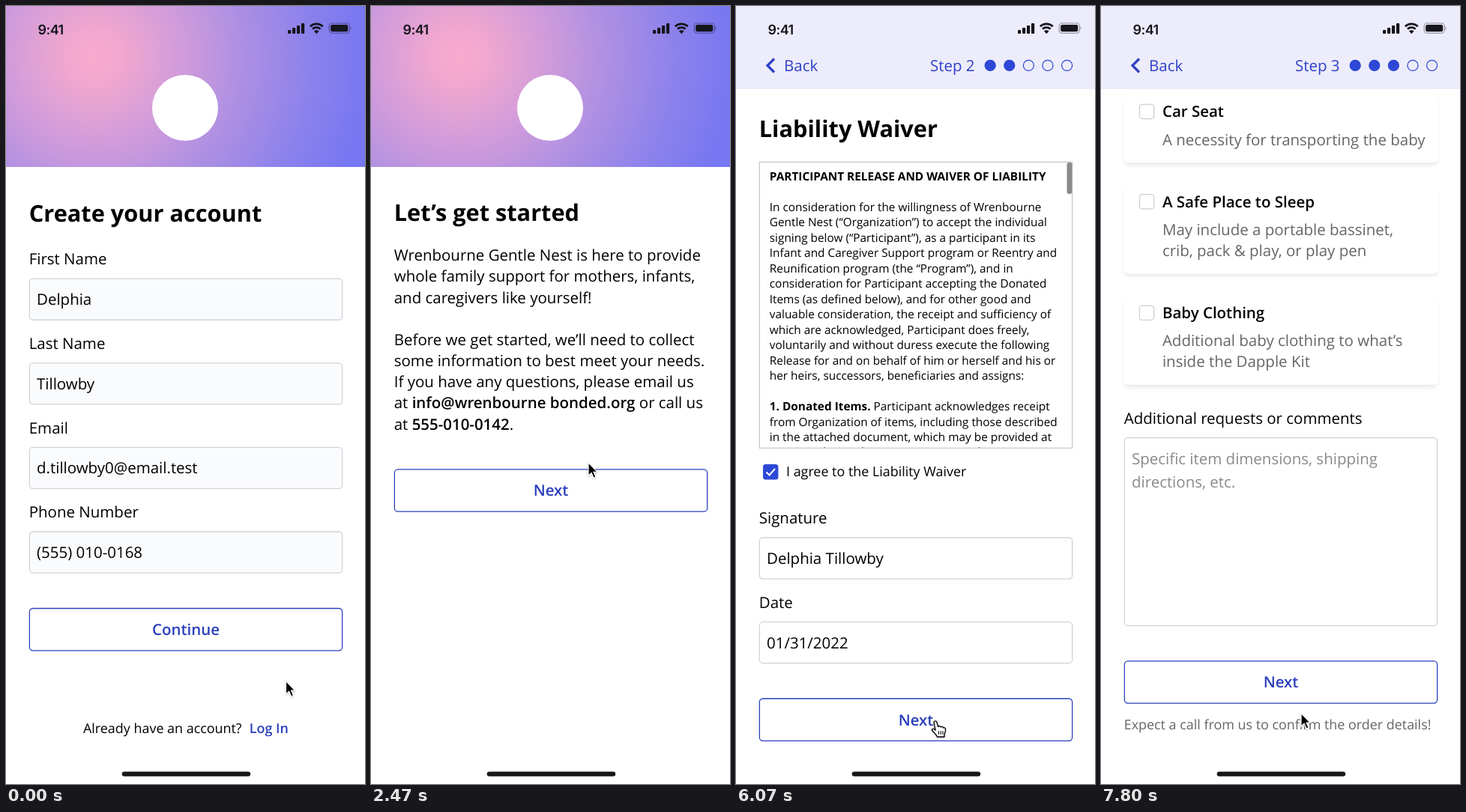
Recreate the animation shown at these times as an HTML page. Size 479x1039 px, loop 8000 ms.

```html
<!DOCTYPE html>
<html lang="en">
<head>
<meta charset="utf-8">
<title>Sign-up flow</title>
<style>
html, body { margin: 0; width: 100%; height: 100%; overflow: hidden; background: #fff; }
svg { display: block; width: 479px; height: 1039px; }
text { font-family: "Open Sans", "Noto Sans", sans-serif; white-space: pre; text-rendering: geometricPrecision; }
.b { font-weight: 600; }
.bb { font-weight: 700; }
.clock { font-family: Inter, sans-serif; letter-spacing: -.6px; }
</style>
</head>
<body>
<svg id="stage" viewBox="0 0 479 1039" xmlns="http://www.w3.org/2000/svg"></svg>
<script>
const LOOP = 8000, FPS = 15;
// the layout is 375 units wide, shown at this scale
const U = 1.28;
const TITLE = 24 * U, BODY = 16 * U, SMALL = 14 * U, FINE = 12 * U;
const BLUE = '#2b3fbc', BRIGHT = '#2d48d6', GREY = '#666';
const LEFT = 24 * U, WIDE = 327 * U, EDGE = U / 2;

// y is the middle of the capitals
const text = (x, y, str, size = BODY, weight = 400, fill = '#000', extra = '') =>
  `<text x="${x}" y="${(y + size * 0.357).toFixed(2)}" font-size="${size.toFixed(2)}" font-weight="${weight}" fill="${fill}" ${extra}>${str}</text>`;
const lines = (x, y, pitch, rows, size, fill) =>
  rows.map((row, i) => text(x, y + i * pitch, row, size, 400, fill)).join('');
const rect = (x, y, w, h, r, fill, extra = '') =>
  `<rect x="${x}" y="${y}" width="${w}" height="${h}" rx="${r}" fill="${fill}" ${extra}/>`;
const line = (d, color, width, extra = '') =>
  `<path d="${d}" fill="none" stroke="${color}" stroke-width="${width}" ${extra}/>`;

const title = (y, str) => text(LEFT, y, str, TITLE, 700);
const frame = (y, h, r, fill, color) =>
  rect(LEFT + EDGE, y, WIDE - U, h, r, fill, `stroke="${color}" stroke-width="${U}"`);
const box = (y, h, fill) => frame(y, h, 4.5, fill, '#d3d3d8');
const field = (y, label, value, fill = '#fff') =>
  text(LEFT, y, label) + box(y + 26.2, 43 * U, fill) + text(41, y + 53.8, value);
const tinted = (y, label, value) => field(y, label, value, '#fafbfd');
const button = (y, label) => frame(y, 44 * U, 4.5, '#fff', BLUE) +
  text(240, y + 28.2, label, BODY, 600, BLUE, 'text-anchor="middle"');
const back = (color, weight) =>
  line('M51 70.5L42 79.5L51 88.5', color, 3.3) + text(64, 79.5, 'Back', BODY, weight, color);
const logIn = text(103, 965, 'Already have an account?', SMALL) + text(324.8, 965, 'Log In', SMALL, 600, BLUE);
const tick = (x, y, color) => line(`M${x + 4.5} ${y + 10.5}l4 4l7.5 -8.5`, color, 2);

const brandHead = rect(0, 0, 479, 215, 0, 'url(#glow)') + '<circle cx="239" cy="136" r="44" fill="#fff"/>';
const stepHead = n => {
  let dots = '';
  for (let i = 0; i < 5; i++)
    dots += `<circle cx="${339.2 + i * 20 * U}" cy="79.4" r="7.04" fill="${i < n ? BRIGHT : 'none'}" stroke="${BRIGHT}" stroke-width="${U}"/>`;
  return rect(0, 0, 479, 111, 0, '#edecfa') + back('#3040c8', 400) +
    text(259, 79.5, 'Step ' + n, BODY, 400, '#3040c8') + dots;
};

const account = brandHead + title(277, 'Create your account') +
  tinted(338, 'First Name', 'Delphia') +
  tinted(450.6, 'Last Name', 'Tillowby') +
  tinted(563.2, 'Email', 'd.tillowby0@email.test') +
  tinted(675.8, 'Phone Number', '(555) 010-0168') +
  button(804.5, 'Continue') + logIn;

const dots = '•'.repeat(10);
const password = brandHead + back('#0a0a14', 600) + title(277, 'Create a password') +
  tinted(338, 'New Password', dots) +
  tinted(450.6, 'Confirm Password', dots) +
  button(579.3, 'Get started') + logIn;

const welcome = brandHead + title(275.7, 'Let’s get started') +
  lines(LEFT, 333, 22 * U, [
    'Wrenbourne Gentle Nest is here to provide',
    'whole family support for mothers, infants,',
    'and caregivers like yourself!',
    '',
    'Before we get started, we’ll need to collect',
    'some information to best meet your needs.',
    'If you have any questions, please email us',
    'at <tspan class="b">info@wrenbourne bonded.org</tspan> or call us',
    'at <tspan class="b">555-010-0142</tspan>.'
  ]) + button(618.9, 'Next');

const household = stepHead(1) + title(164, 'Household Information') +
  field(223, 'Number of Adults', '1') +
  field(335.6, 'Number of Children (current)', '3') +
  field(448.2, 'Ages of Children', '3, 8, 11') +
  button(576.7, 'Next');

const waiver = stepHead(2) + title(164, 'Liability Waiver') +
  frame(208.4, 382, 0, '#fff', '#c8c8cc') +
  '<g clip-path="url(#paper)">' +
  text(35 * U, 227.5, 'PARTICIPANT RELEASE AND WAIVER OF LIABILITY', FINE, 700) +
  lines(35 * U, 268.3, 16 * U, [
    'In consideration for the willingness of Wrenbourne',
    'Gentle Nest (“Organization”) to accept the individual',
    'signing below (“Participant”), as a participant in its',
    'Infant and Caregiver Support program or Reentry and',
    'Reunification program (the “Program”), and in',
    'consideration for Participant accepting the Donated',
    'Items (as defined below), and for other good and',
    'valuable consideration, the receipt and sufficiency of',
    'which are acknowledged, Participant does freely,',
    'voluntarily and without duress execute the following',
    'Release for and on behalf of him or herself and his or',
    'her heirs, successors, beneficiaries and assigns:',
    '',
    '<tspan class="bb">1. Donated Items.</tspan> Participant acknowledges receipt',
    'from Organization of items, including those described',
    'in the attached document, which may be provided at',
    'any time during the Program (“Donated Items”)'
  ], FINE) + '</g>' +
  rect(441.5, 209, 6.8, 42, 3, '#8b8b8e') +
  rect(36, 612, 20.4, 20.4, 3.5, BRIGHT) + tick(36, 612, '#fff') +
  text(67, 622, 'I agree to the Liability Waiver', SMALL) +
  field(683.8, 'Signature', 'Delphia Tillowby') +
  field(796.4, 'Date', '01/31/2022') +
  button(925, 'Next');

const card = (y, h, name, rows, done) =>
  rect(LEFT, y - 21, WIDE, h, 6, '#fff', 'filter="url(#lift)"') +
  rect(51.5, y - 9.6, 19.2, 19.2, 3.5, '#fff', `stroke="#cfcfd4" stroke-width="${U}"`) +
  (done ? tick(51, y - 10, '#777') : '') +
  text(64 * U, y, name, BODY, 600, done ? GREY : '#000') +
  lines(64 * U, y + 37.3, 22 * U, rows, BODY, GREY);

const request = '<g id="scroll">' + title(153, 'Request Items') +
  lines(LEFT, 203, 22 * U, ['Wrenbourne Gentle Nest will deliver you', 'supplies, so you’re ready for the child!']) +
  card(306, 173, 'Dapple Kit', [
    'Clothing, blankets, bottles, pacifiers,',
    'bathing supplies, diapers, wipes,',
    'diaper cream, formula, burp cloths,',
    '&amp; toys!'
  ], true) +
  card(511, 89, 'Car Seat', ['A necessity for transporting the baby']) +
  card(631.3, 117, 'A Safe Place to Sleep', ['May include a portable bassinet,', 'crib, pack &amp; play, or play pen']) +
  card(779.7, 117, 'Baby Clothing', ['Additional baby clothing to what’s', 'inside the Dapple Kit']) +
  text(LEFT, 920.5, 'Additional requests or comments') + box(946.7, 251, '#fff') +
  lines(41, 974.5, 24 * U, ['Specific item dimensions, shipping', 'directions, etc.'], BODY, '#8a8a8a') +
  button(1244.8, 'Next') +
  text(LEFT, 1329.7, 'Expect a call from us to confirm the order details!', SMALL, 400, GREY) +
  '</g>' + stepHead(3);

const status = () => {
  let bars = '';
  for (let i = 0; i < 4; i++)
    bars += rect(376 + i * 6, 32 - i * 3, 4.2, 5 + i * 3, 1.2, '#15151c');
  return text(42.6, 31.5, '9:41', 18, 600, '#15151c', 'class="clock"') + bars +
    line('M405.8 27.2a12.3 12.3 0 0 1 17 0M409 30.8a7.8 7.8 0 0 1 10.6 0', '#15151c', 2.8) +
    '<path d="M411 33.6a5 5 0 0 1 6.6 0l-3.3 3.6z" fill="#15151c"/>' +
    rect(431.2, 23, 27, 13.2, 3.8, 'none', 'stroke="#15151c" stroke-opacity=".45" stroke-width="1.1"') +
    rect(433.2, 25, 23, 9.2, 2, '#15151c') +
    '<path d="M459.6 27.2q2 2.4 0 4.8z" fill="#15151c" opacity=".5"/>';
};

const pointer =
  '<g id="arrow" filter="url(#soft)"><path d="M0 0V17.6L4.1 13.8L7 20.6L10 19.3L7.1 12.7H12.2Z" fill="#000" stroke="#fff" stroke-width="1.2"/></g>' +
  '<g id="hand" filter="url(#soft)"><path d="M-2 2C-2-.8 1.6-.8 2 1.5L3.6 7.5C4.5 6 7 6.3 7.2 8C8.3 6.8 10.3 7.3 10.5 9C11.5 8 13.5 9 13.5 10.7C13.8 14 12.5 16 12 18V21H2.5C1.5 18-1 16-4 12.8C-5.5 10.8-3 9.6-1.3 11L.2 12.3Z" fill="#fff" stroke="#000" stroke-width="1.3" stroke-linejoin="round"/>' +
  line('M4.4 13.2V17.8M7.2 13.2V17.8M10 13.2V17.8', '#000', 1.1) + '</g>';

// start time and content of each screen
const screens = [[0, account], [1000, password], [1930, welcome], [3730, household], [5130, waiver], [6200, request]];

const stage = document.getElementById('stage');
stage.innerHTML = `<defs>
  <radialGradient id="glow" gradientUnits="userSpaceOnUse" cx="118" cy="68" r="365">
    <stop offset="0" stop-color="#f9abcd"/><stop offset=".1" stop-color="#f1a7cf"/>
    <stop offset=".33" stop-color="#cf9bdb"/><stop offset=".55" stop-color="#ac8fe3"/>
    <stop offset=".8" stop-color="#8b81ec"/><stop offset="1" stop-color="#7777f2"/>
  </radialGradient>
  <clipPath id="paper"><rect x="32" y="209" width="409" height="381"/></clipPath>
  <filter id="lift" x="-5%" y="-10%" width="110%" height="130%"><feDropShadow dx="0" dy="4" stdDeviation="2.6" flood-opacity=".08"/></filter>
  <filter id="soft" x="-50%" y="-50%" width="200%" height="200%"><feDropShadow dx="0" dy="1" stdDeviation="1" flood-opacity=".3"/></filter>
</defs>` + screens.map(s => `<g class="screen">${s[1]}</g>`).join('') +
  status() + rect(154.7, 1022.4, 134 * U, 5 * U, 3.2, '#17171a') + `<g id="cursor">${pointer}</g>`;

// time, x, y
const path = [
  [530, 373.5, 901.5], [870, 328, 826], [1400, 328, 826], [1470, 327, 790], [1600, 327, 790],
  [1670, 326, 770], [1870, 290, 608], [2400, 290, 608], [2800, 290, 618], [3000, 290, 618],
  [3330, 290, 636], [4270, 290, 636], [4600, 290, 601], [5400, 290, 601], [5930, 266, 955],
  [6200, 266, 955], [6270, 267, 954], [7600, 267, 954], [7800, 267, 944.5]
];
const scrollPath = [[7060, 0], [7070, 15], [7130, 117], [7200, 230], [7270, 300], [7330, 370]];
const handTimes = [[870, 1000], [1870, 1930], [4530, 5130], [5870, 6200]];

const at = (keys, t, col) => {
  const i = keys.findIndex(k => k[0] > t);
  if (i === 0) return keys[0][col];
  if (i < 0) return keys[keys.length - 1][col];
  const a = keys[i - 1], b = keys[i];
  return a[col] + (b[col] - a[col]) * (t - a[0]) / (b[0] - a[0]);
};

const get = id => document.getElementById(id);
const groups = [...document.querySelectorAll('.screen')];
const cursor = get('cursor'), arrow = get('arrow'), hand = get('hand'), scroll = get('scroll');
const show = (el, on) => { el.style.display = on ? '' : 'none'; };

function draw(now) {
  // the motion is held on a 15 per second grid
  const tickNo = Math.floor((now % LOOP + 4) * FPS / 1000);
  const t = Math.round(tickNo * 100 / FPS) * 10;
  const current = screens.filter(s => s[0] <= t).length - 1;
  groups.forEach((g, i) => show(g, i === current));
  scroll.setAttribute('transform', `translate(0 ${-at(scrollPath, t, 1)})`);
  cursor.setAttribute('transform', `translate(${at(path, t, 1)} ${at(path, t, 2)})`);
  const over = handTimes.some(([a, b]) => t >= a && t < b);
  show(hand, over);
  show(arrow, !over);
}

const start = performance.now();
const loop = () => {
  draw(performance.now() - start);
  requestAnimationFrame(loop);
};
loop();
</script>
</body>
</html>
```
